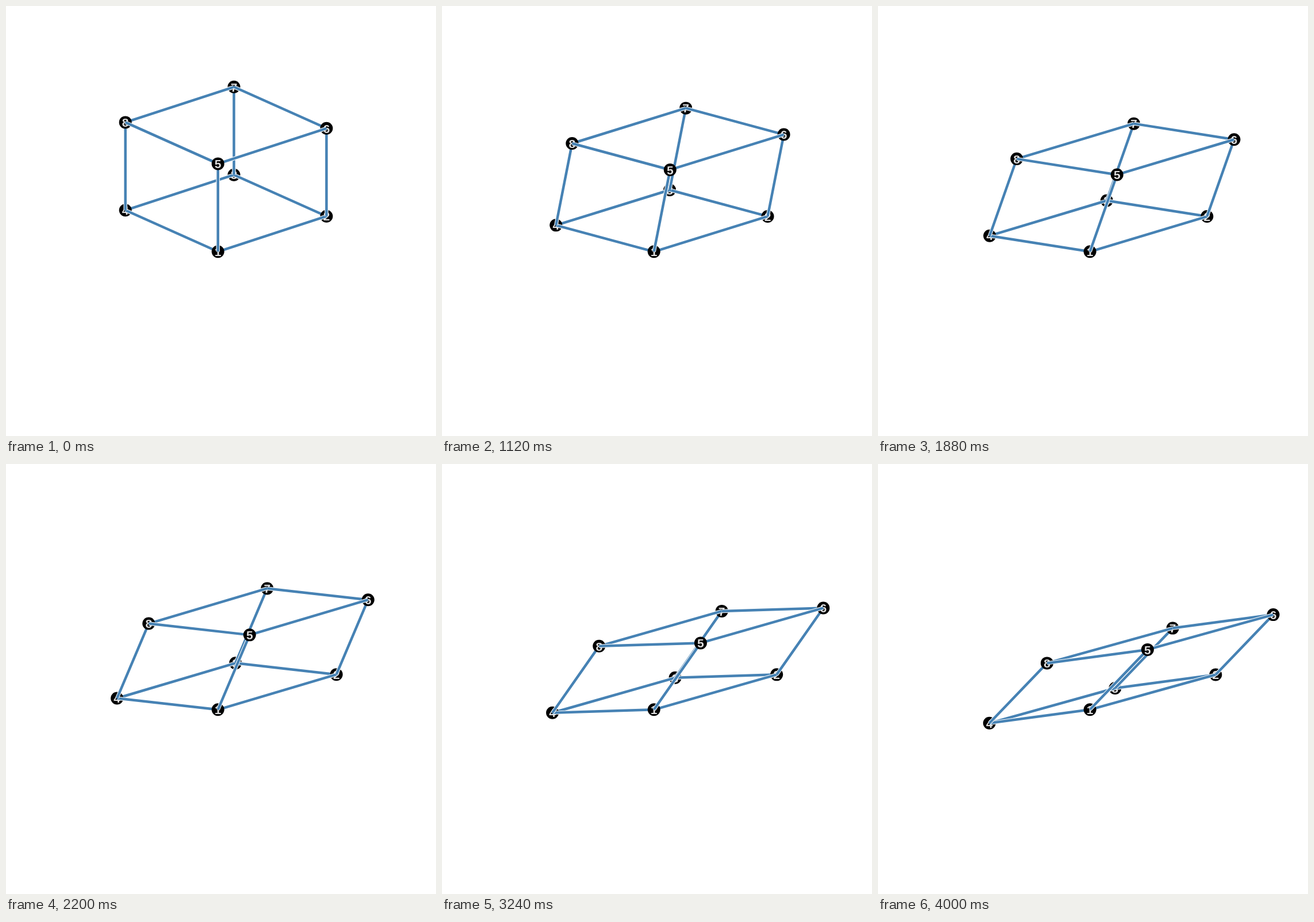
These frames come from a looping animation (748 px wide and 748 px high, 4040 ms). An HTML page with a canvas:

```html
<!DOCTYPE html>
<html>
<head>
<meta charset="utf-8">
<title>Shearing cell</title>
<style>
  html, body { margin: 0; width: 100%; height: 100%; overflow: hidden; background: #fff; }
  canvas { display: block; }
</style>
</head>
<body>
<canvas id="stage" width="748" height="748"></canvas>
<script>
const ctx = document.getElementById('stage').getContext('2d');
const STEP = 40, STEPS = 101;

// Back to front: one digit is a corner, two digits are an edge.
const ORDER = '3 34 23 37 4 2 7 14 12 48 26 78 67 1 6 8 15 58 56 5'.split(' ');

// The three cell edges that start at corner 1, for s from 0 to 1.
function cellEdges(s) {
  return {
    a: [188.8 + s * (33.2 - 3.4 * s), -61.6 + 0.8 * s],
    b: [-161 + s * (-41 + s * (25.6 + 1.5 * s)), -72 + s * (90 + s * (13.2 - 7.7 * s))],
    c: [100.2 * s, -152.9 + s * (33.5 + 15 * s)]
  };
}

function corners(s) {
  const { a, b, c } = cellEdges(s);
  const at = (i, j, k) => [0, 1].map(n => [368.7, 427.3][n] + i * a[n] + j * b[n] + k * c[n]);
  return [null,
    at(0, 0, 0), at(1, 0, 0), at(1, 1, 0), at(0, 1, 0),
    at(0, 0, 1), at(1, 0, 1), at(1, 1, 1), at(0, 1, 1)];
}

function drawEdge(p, q) {
  ctx.beginPath();
  ctx.moveTo(...p);
  ctx.lineTo(...q);
  for (const [width, color] of [[6.5, '#fff'], [4.5, '#4682b4']]) {
    ctx.lineWidth = width;
    ctx.strokeStyle = color;
    ctx.stroke();
  }
}

function drawCorner([x, y], label) {
  ctx.fillStyle = '#000';
  ctx.beginPath();
  ctx.arc(x, y, 11, 0, 2 * Math.PI);
  ctx.fill();
  ctx.fillStyle = '#ddd';
  ctx.fillText(label, x, y + 7.7);
}

function draw() {
  const s = Math.floor(performance.now() / STEP) % STEPS / (STEPS - 1);
  const pts = corners(s);
  ctx.fillStyle = '#fff';
  ctx.fillRect(0, 0, 748, 748);
  ctx.font = 'bold 21px "Liberation Sans", Arial, sans-serif';
  ctx.textAlign = 'center';
  for (const [m, n] of ORDER) {
    if (n) drawEdge(pts[m], pts[n]);
    else drawCorner(pts[m], m);
  }
  requestAnimationFrame(draw);
}
draw();
</script>
</body>
</html>
```
